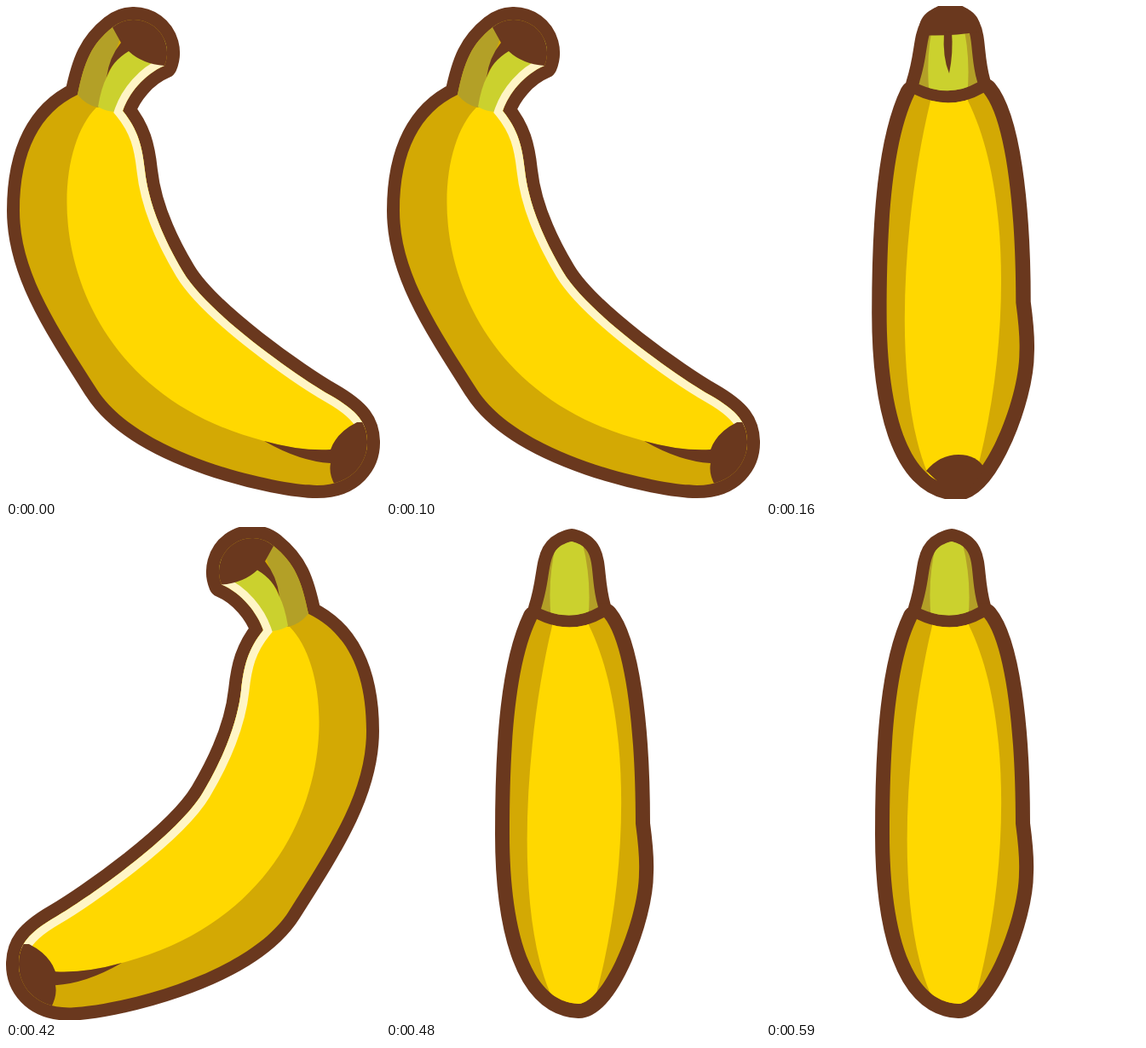
An HTML page that plays this animation: 439 by 578 pixels, repeating every 660 ms.

```html
<!DOCTYPE html>
<html lang="en">
<head>
<meta charset="utf-8">
<title>Spinning banana</title>
<style>
  html, body { margin: 0; width: 100%; height: 100%; overflow: hidden; background: #fff; }
  .strip { display: block; width: 1756px; height: 578px; animation: turn 660ms step-end infinite; }
  .peel { fill: #6a381e; }
  .shade { fill: #d3a904; }
  .flesh { fill: #ffd800; }
  .stem { fill: #cbd12e; }
  .stem-shade { fill: #b3a027; }
  .rim { stroke: #6a381e; stroke-width: 30; stroke-linejoin: round; paint-order: stroke; }
  .wide { stroke-width: 34; }
  .shine { fill: none; stroke: #fff5c6; stroke-width: 19; stroke-dasharray: 560 2000; }

  /* each pose holds 160 ms, the last one 180 ms */
  @keyframes turn {
    0% { transform: translateX(0); }
    24.2424% { transform: translateX(-439px); }
    48.4848% { transform: translateX(-878px); }
    72.7273%, 100% { transform: translateX(-1317px); }
  }
</style>
</head>
<body>
<svg class="strip" viewBox="0 0 1756 578">
  <defs>
    <path id="curve" d="M186 70C162 80 144 103 137 123C155 145 160 165 163 193S178 262 208 312S345 436 380 456S424 490 424 512S408 562 365 562S157 528 107 450S16 310 16 240S40 125 84 104C92 65 100 45 125 25A39 39 0 0 1 186 70Z"/>
    <clipPath id="in-curve"><use href="#curve"/></clipPath>

    <g id="side">
      <use href="#curve" class="shade rim"/>
      <g clip-path="url(#in-curve)">
        <path class="flesh" d="M106 119C40 185 50 445 303 510Q345 522 384 521H440V119Z"/>
        <path class="stem-shade" d="M84 104Q95 117 108 119L118 84L140 20H80Z"/>
        <path class="stem" d="M108 118Q112 95 118 84L140 40H200L127 124Q115 123 108 118Z"/>
        <use href="#curve" class="shine"/>
        <path class="peel" d="M125 25L135 43Q121 60 118 84Q124 65 144 53Q160 68 186 70H210V0H110Z"/>
        <path class="peel" d="M303 510Q345 522 381 520Q388 500 412 488H440V580H400Q377 556 381 536Q345 534 303 510Z"/>
      </g>
    </g>

    <path id="body" d="M177 108C152 160 145 250 145 360C145 460 165 557 226 559C256 558 297 460 297 405Q298 385 293 348C293 230 280 135 256 106Q218 128 177 108Z"/>
    <path id="neck" d="M182 96C197 50 185 25 218 17C250 25 237 50 249 94Q218 112 182 96Z"/>
    <clipPath id="in-body"><use href="#body"/></clipPath>
    <clipPath id="in-neck"><use href="#neck"/></clipPath>

    <g id="front">
      <use href="#neck" class="peel rim"/>
      <use href="#body" class="shade rim wide"/>
      <path class="flesh" clip-path="url(#in-body)" d="M195 116C165 240 149 440 192 545L210 570H240L246 550C285 410 290 220 238 115V100H195Z"/>
      <use href="#neck" class="stem-shade"/>
      <path class="stem" clip-path="url(#in-neck)" d="M200 20Q189 60 194 110H237Q242 65 231 20L218 0Z"/>
    </g>
  </defs>

  <svg width="439" height="578"><use href="#side"/></svg>

  <svg x="439" width="439" height="578">
    <use href="#front" transform="matrix(1.025 0 0 1.017 -7 -6)"/>
    <path class="peel" d="M180 34C172 -11 256 -13 251 30Q216 36 180 34Z"/>
    <path class="peel" d="M209 31Q207 60 215 79Q220 55 218 30Z"/>
    <path class="peel" d="M188 545Q204 526 226 526T257 543L235 570H215Z"/>
  </svg>

  <svg x="878" width="439" height="578">
    <use href="#side" transform="matrix(-1 0 0 1.008 439 -3)"/>
  </svg>

  <svg x="1317" width="439" height="578"><use href="#front"/></svg>
</svg>
</body>
</html>
```
